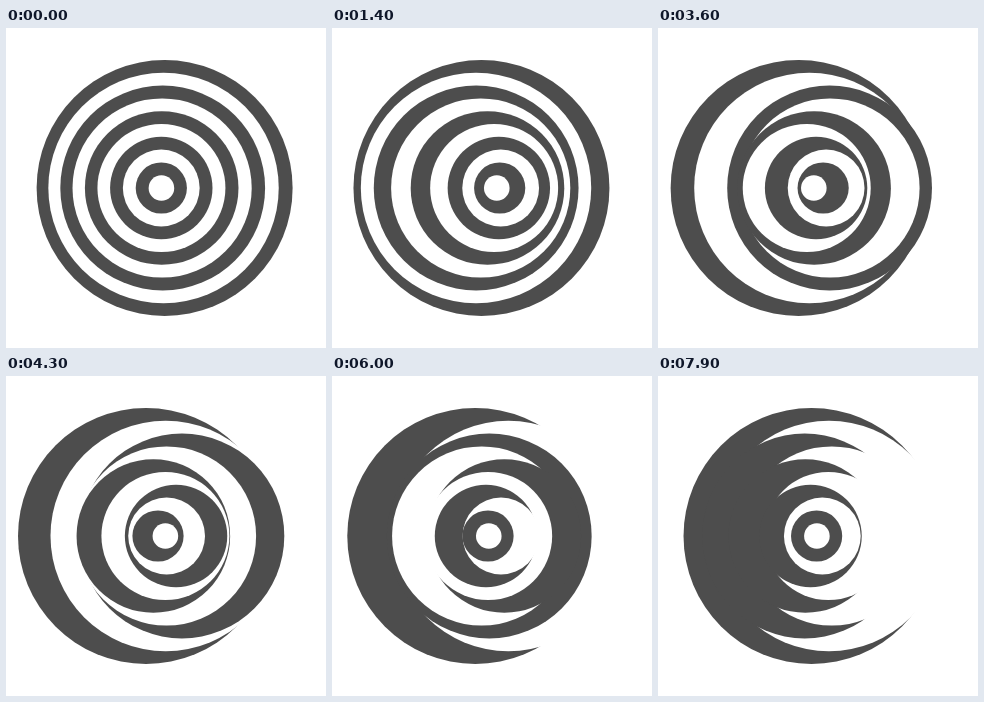
Animation, 320 px wide and 320 px high, one loop 8000 ms. Source, as an HTML page:

```html
<!DOCTYPE html>
<html lang="en">
<head>
<meta charset="utf-8">
<title>Swinging discs</title>
<style>
  html, body { margin: 0; width: 100%; height: 100%; overflow: hidden; background: #fff; }
  svg { display: block; width: 100%; height: 100%; }
</style>
</head>
<body>
<svg id="stage" viewBox="0 0 320 320"></svg>
<script>
  const LOOP = 8000, STEP = 100;
  const COUNT = 10, CENTER = 160, RADIUS = 128;
  const PERIOD = 18100, LEAD = 200;   // slowest swing, and time already elapsed at the start
  const SWING = 20, DECAY = 0.892;    // outer amplitude, ratio from disc to disc

  const stage = document.getElementById('stage');
  const discs = Array.from({ length: COUNT }, (_, i) => {
    const disc = document.createElementNS('http://www.w3.org/2000/svg', 'circle');
    disc.setAttribute('cy', CENTER);
    disc.setAttribute('r', RADIUS * (1 - i / COUNT));
    disc.setAttribute('fill', i % 2 ? '#fff' : '#4d4d4d');
    return stage.appendChild(disc);
  });

  // Each disc inward swings one more time per period than the one outside it.
  function draw(time) {
    const turn = 2 * Math.PI * (time + LEAD) / PERIOD;
    discs.forEach((disc, i) => {
      const x = CENTER - SWING * DECAY ** i * Math.sin((i + 1) * turn);
      disc.setAttribute('cx', x.toFixed(3));
    });
  }

  const start = performance.now();
  function tick() {
    const time = (performance.now() - start) % LOOP;
    draw(Math.floor(time / STEP) * STEP);
    requestAnimationFrame(tick);
  }
  tick();
</script>
</body>
</html>
```
